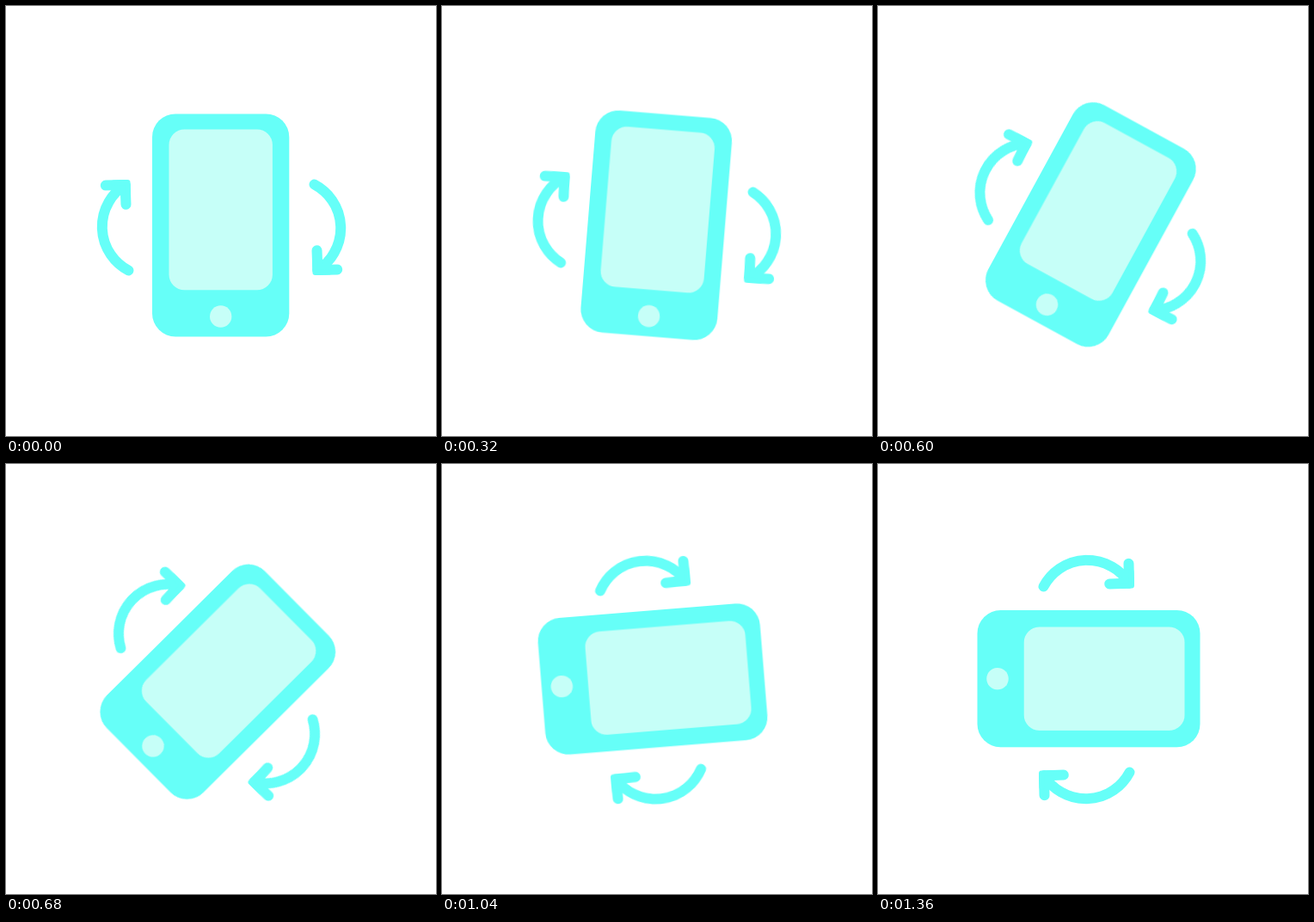
Recreate the animation shown at these times as an HTML page. Size 500 by 500 pixels, loop 2000 ms.

```html
<!DOCTYPE html>
<html lang="en">
<head>
<meta charset="utf-8">
<title>Rotate device</title>
<style>
  html, body {
    margin: 0;
    width: 100%;
    height: 100%;
    overflow: hidden;
    background: #fff;
  }
  svg {
    display: block;
    width: 100%;
    height: 100%;
  }
  .device {
    transform-origin: 250px 250px;
    animation: turn 2s infinite;
  }
  .body { fill: #66fff8; }
  .glass { fill: #c6fff8; }
  .arrow {
    fill: none;
    stroke: #66fff8;
    stroke-width: 12;
    stroke-linecap: round;
    stroke-linejoin: round;
  }
  .tip { stroke-width: 6; }

  /* turn a quarter, hold, then snap back */
  @keyframes turn {
    0% {
      transform: rotate(0deg);
      animation-timing-function: cubic-bezier(.71, 0, .29, 1);
    }
    68%, 100% { transform: rotate(90deg); }
  }
</style>
</head>
<body>
<svg viewBox="0 0 500 500">
  <defs>
    <g id="arrow" class="arrow">
      <path d="M142.5 307.5A57.5 57.5 0 0 1 138.6 208"/>
      <path d="M115.8 208.6L138.6 208L139.5 230.8"/>
      <path class="tip" d="M125 205.4L141.5 204.9L142 218"/>
    </g>
  </defs>
  <g class="device">
    <rect class="body" x="170" y="125.4" width="159.3" height="259.1" rx="27"/>
    <rect class="glass" x="189.5" y="143.5" width="120.4" height="186.8" rx="18"/>
    <circle class="glass" cx="249.7" cy="361" r="12.7"/>
    <use href="#arrow"/>
    <use href="#arrow" transform="rotate(180 250.5 257.5)"/>
  </g>
</svg>
</body>
</html>
```
